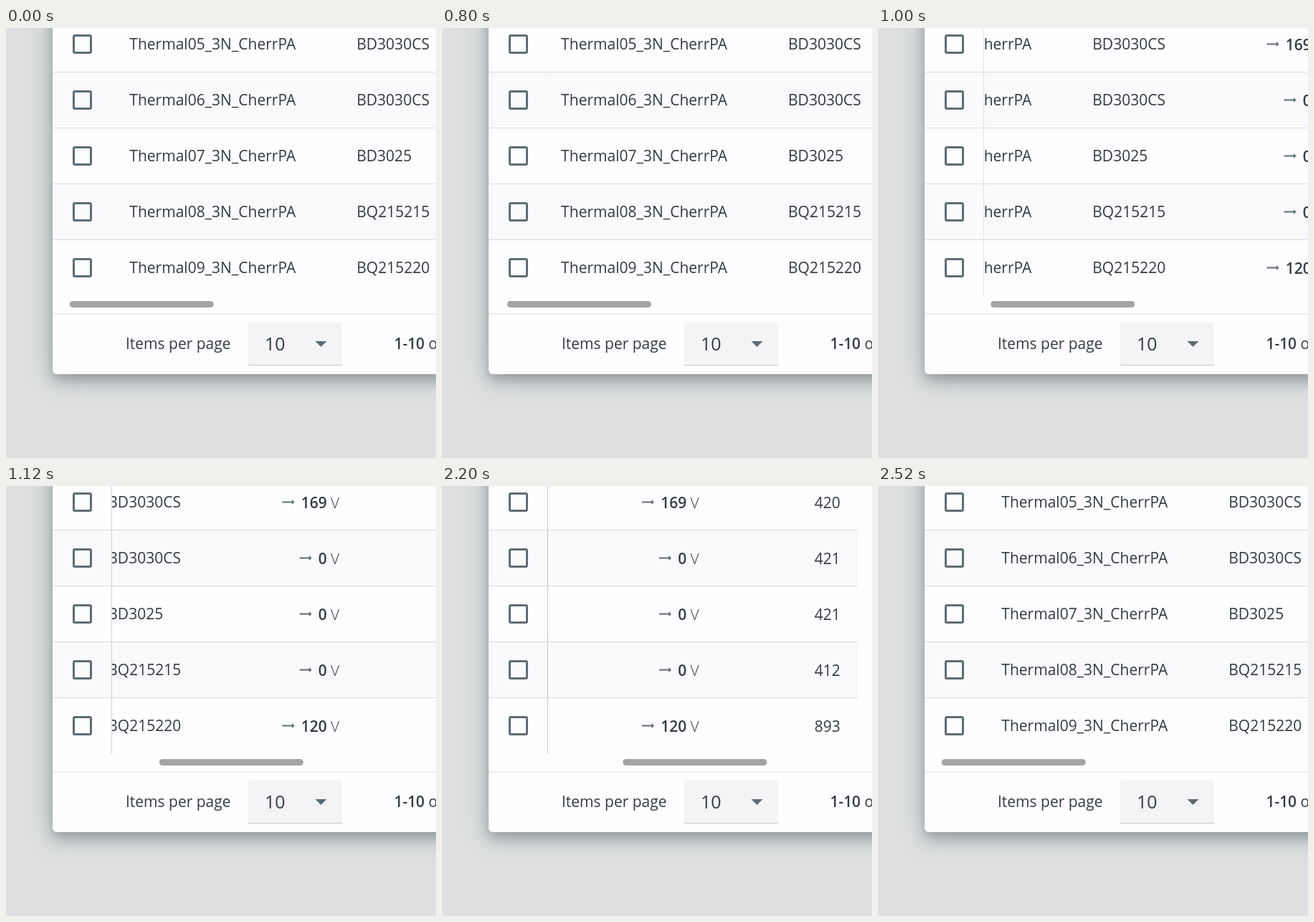
Write an HTML page that moves like this. It is 600 px wide and 600 px high and loops after 2.84 s.

```html
<!DOCTYPE html>
<html lang="en">
<head>
<meta charset="utf-8">
<title>Table scroll</title>
<style>
  html, body { margin: 0; width: 100%; height: 100%; overflow: hidden; background: #dddfe0; }
  .stage { position: absolute; inset: 0; overflow: clip; contain: paint; }
  .card {
    position: absolute; left: 65px; top: -60px; width: 700px; height: 543px;
    border-radius: 6px; background: #fefdff;
    box-shadow: 0 8px 18px rgba(60, 75, 80, .38), 0 5px 38px rgba(90, 105, 112, .28);
  }
  svg { position: absolute; left: 0; top: 0; }
  text { font: 21px "Open Sans", sans-serif; fill: #323c42; white-space: pre; }
  .bold { font-weight: 600; }
  .unit { font-weight: 300; }
  .select { font-size: 25px; }
  .border { fill: #dcdbdf; }
  .box { fill: none; stroke: #5f6d75; stroke-width: 3; }
  .icon { fill: #5f6d75; }
</style>
</head>
<body>
<div class="stage">
<div class="card"></div>
<svg width="600" height="600">
  <clipPath id="area"><rect x="65" width="535" height="399"/></clipPath>
  <g clip-path="url(#area)"><g id="content"></g></g>
  <g id="sticky"></g>
  <rect id="edge" x="147" width="1" height="374" fill="#c6c6ca"/>
  <rect id="thumb" y="381" width="201" height="9" rx="4.5" fill="#a4a4a6"/>
  <rect class="border" x="65" y="398.5" width="535" height="1"/>
  <text x="167" y="448">Items per page</text>
  <path d="M338 470V415q0-4 4-4H465q4 0 4 4V470z" fill="#f4f3f6"/>
  <rect x="338" y="470" width="131" height="1" fill="#c6c6ca"/>
  <text class="select" x="361" y="450">10</text>
  <path class="icon" d="M431.5 437h16l-8 8z"/>
  <text x="541.4" y="448"><tspan class="bold">1-10</tspan> of</text>
</svg>
</div>
<script>
const LOOP = 2840, STEP = 40, DISTANCE = 432, THUMB_RATIO = 0.361;
const $ = id => document.getElementById(id);

const rows = [
  ["BD3030CS", 169, 420],
  ["BD3030CS", 0, 421],
  ["BD3025", 0, 421],
  ["BQ215215", 0, 412],
  ["BQ215220", 120, 893],
];

const stripe = (i, y, right) => `
  <rect x="65" y="${y}" width="${right - 65}" height="78" fill="${i % 2 ? "#faf9fc" : "#fefdff"}"/>
  ${i < 4 ? `<rect class="border" x="65" y="${y + 77}" width="${right - 65}" height="1"/>` : ""}`;

rows.forEach(([model, volts, value], i) => {
  const y = i * 78 - 16, base = y + 46;
  const arrowX = 732.5 + (3 - String(volts).length) * 12;
  $("content").innerHTML += stripe(i, y, 1033.5) + `
    <text x="172.3" y="${base}">Thermal0${i + 5}_3N_CherrPA</text>
    <text x="489.2" y="${base}">${model}</text>
    <path class="icon" d="M${arrowX} ${y + 37.6}h13.4v-2.7l3.6 3.6l-3.6 3.6v-2.7h-13.4z"/>
    <text class="bold" x="794.7" y="${base + 1}" text-anchor="end">${volts}</text>
    <text class="unit" x="800" y="${base + 1}">V</text>
    <text x="973.3" y="${base + 1}">${value}</text>`;
  $("sticky").innerHTML += stripe(i, y, 148) +
    `<rect class="box" x="94.5" y="${y + 26.5}" width="24" height="24" rx="1.5"/>`;
});

// Cubic Bezier easing, solved by bisection
function bezier(x1, y1, x2, y2) {
  const at = (a, b, s) => 3 * (1 - s) ** 2 * s * a + 3 * (1 - s) * s * s * b + s ** 3;
  return t => {
    if (t <= 0 || t >= 1) return t <= 0 ? 0 : 1;
    let low = 0, high = 1;
    for (let i = 0; i < 30; i++) {
      const mid = (low + high) / 2;
      if (at(x1, x2, mid) < t) low = mid; else high = mid;
    }
    return at(y1, y2, low);
  };
}
const easeInOut = bezier(0.42, 0, 0.58, 1);
const easeInOutBack = bezier(0.7, -0.4, 0.4, 1.4);

function draw(now) {
  const time = Math.floor(now % LOOP / STEP) * STEP;
  const progress = easeInOut((time - 755) / 527) - easeInOutBack((time - 2160) / 339);
  const scroll = progress * DISTANCE;
  $("content").setAttribute("transform", `translate(${-scroll})`);
  $("thumb").setAttribute("x", 88.7 + scroll * THUMB_RATIO);
  $("edge").setAttribute("opacity", Math.min(1, Math.max(0, progress)));
}

let start;
function tick(now) {
  start ??= now;
  draw(now - start);
  requestAnimationFrame(tick);
}
draw(0);
requestAnimationFrame(tick);
</script>
</body>
</html>
```
